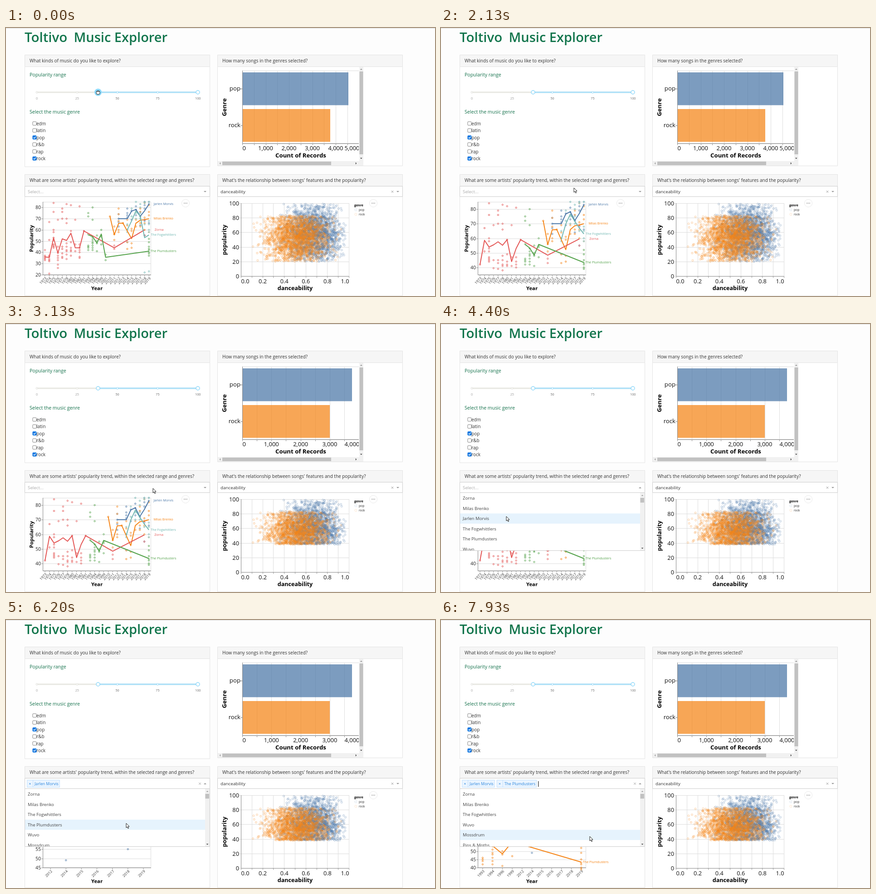
Write an HTML page with a canvas that moves like this. It is 946x592 px and loops after 8 s.

```html
<!DOCTYPE html>
<html lang="en">
<head>
<meta charset="utf-8">
<title>Music Explorer</title>
<style>
html, body { margin: 0; width: 946px; height: 592px; overflow: hidden; background: #fdfdfd; }
canvas { display: block; }
</style>
</head>
<body>
<canvas id="stage" width="946" height="592"></canvas>
<script>
const LOOP = 8000;
const FACE = '"Open Sans", "Noto Sans", sans-serif';
const BLUE = '#4c78a8', ORANGE = '#f58518';
const PALETTE = [BLUE, ORANGE, '#e45756', '#72b7b2', '#54a24b'];
const stage = document.getElementById('stage');
let c = stage.getContext('2d');

// moments at which the page reacts
const AT = { release: 330, trend: 1400, bars: 2700, open: 3730,
  pick1: 4600, solo: 5300, pick2: 6600, duo: 7400 };

// pointer path: time, x, y
const PATH = [[0, 203, 142], [330, 203, 142], [730, 222, 167], [1000, 224, 170], [2130, 293, 353],
  [3130, 324, 363], [3730, 324, 363], [4400, 144, 425], [4600, 144, 426],
  [6200, 265, 449], [6600, 265, 451], [7930, 328, 478]];

// all: mean per year for the full range, top: for popularity of 38 and above
const ACTS = [
  { name: 'Jarlen Morvis',
    all: { 2012: 70, 2014: 70, 2015: 76.7, 2016: 78.2, 2017: 72.2, 2018: 77, 2019: 83 },
    dots: { 2012: [70, 74, 67, 63], 2014: [79, 75, 73, 71, 49], 2015: [77, 69], 2016: [78, 81, 73],
      2017: [76, 72, 64], 2018: [85, 82, 79, 68, 55], 2019: [83, 85, 66] } },
  { name: 'Milas Brenko',
    all: { 2010: 72, 2011: 55.7, 2012: 65.8, 2013: 66, 2014: 59, 2015: 52.2, 2016: 66, 2017: 68.6, 2018: 69.1, 2019: 70 },
    dots: { 2010: [72], 2011: [56, 51, 63], 2012: [79, 74, 68, 60, 58], 2013: [66], 2014: [64, 49, 43, 69],
      2015: [61, 59, 48, 44], 2016: [69, 63], 2017: [79, 76, 66, 63], 2018: [84, 71, 66, 60], 2019: [82, 76, 73, 58] } },
  { name: 'Zorna',
    all: { 1973: 35.8, 1974: 35.4, 1975: 52.7, 1976: 39.4, 1977: 52, 1978: 50.6, 1980: 57, 1981: 44, 1982: 44, 1991: 59, 2011: 44, 2018: 60 },
    top: { 1973: 42, 1974: 58.6, 1975: 54, 1976: 55.5, 1977: 57.6, 1978: 55.2, 1980: 59, 1981: 44, 1982: 53, 1991: 59, 2011: 48.4, 2018: 59.6 },
    dots: { 1973: [42, 37, 36, 35, 34, 33], 1974: [67, 51, 37, 36, 34, 33, 32, 21],
      1975: [84, 76, 60, 58, 53, 51, 47, 46, 45, 44], 1976: [69, 45, 39.5, 37, 35, 33, 29, 26],
      1977: [79, 76, 70, 45, 43, 39, 36, 35], 1978: [83, 70, 66, 48, 45, 42, 41, 38, 34],
      1980: [82, 59, 49, 44, 42, 41, 37], 1981: [69, 47, 41], 1982: [81, 47, 44, 42, 40, 36, 35], 1991: [59],
      2011: [46, 43], 2018: [69, 55] } },
  { name: 'The Fogwhittlers',
    all: { 2014: 60, 2015: 68, 2016: 77, 2017: 72, 2018: 53, 2019: 55.5 },
    top: { 2014: 59.2, 2015: 69.8, 2016: 76.6, 2017: 71.6, 2018: 67, 2019: 63 },
    dots: { 2014: [65, 60, 58], 2015: [79, 72], 2016: [85, 75, 70], 2017: [83, 80, 75, 70],
      2018: [85, 84, 65, 22], 2019: [85, 68, 65, 60, 58, 23] } },
  { name: 'The Plumdusters',
    all: { 1993: 55.6, 1994: 54, 1996: 48.3, 1999: 56.3, 2001: 35.5, 2019: 41 },
    top: { 1993: 55.8, 1994: 53.3, 1996: 48.4, 1999: 55.8, 2019: 43.4 },
    dots: { 1993: [75, 72, 56, 46, 45, 44, 42], 1994: [80, 69, 53, 51, 49, 48, 46, 44, 42],
      1996: [55, 50, 48, 41], 1999: [60, 55, 54, 47], 2001: [37.9, 33], 2019: [52, 49, 45, 43, 42, 40, 39, 37] } }
];
const OPTIONS = ['Zorna', ACTS[1].name, ACTS[0].name, ACTS[3].name, ACTS[4].name, 'Wuvo', 'Mossdrum', "Pins & Moths"];

function text(s, x, y, size, color = '#333', align = 'left', weight = 400) {
  c.font = `${weight} ${size}px ${FACE}`;
  c.fillStyle = color;
  c.textAlign = align;
  c.fillText(s, x, y);
}
function turned(s, x, y, angle, ...style) {
  c.save();
  c.translate(x, y);
  c.rotate(angle);
  text(s, 0, 0, ...style);
  c.restore();
}
function rect(x, y, w, h, fill, stroke) {
  if (fill) { c.fillStyle = fill; c.fillRect(x, y, w, h); }
  if (stroke) { c.strokeStyle = stroke; c.lineWidth = 1; c.strokeRect(x + .5, y + .5, w - 1, h - 1); }
}
function line(points, color, width = 1) {
  c.strokeStyle = color;
  c.lineWidth = width;
  c.lineJoin = 'round';
  c.beginPath();
  points.forEach(p => c.lineTo(...p));
  c.stroke();
}
function ring(x, y, r, stroke, width = 1, fill) {
  c.beginPath();
  c.arc(x, y, r, 0, 7);
  if (fill) { c.fillStyle = fill; c.fill(); }
  c.strokeStyle = stroke;
  c.lineWidth = width;
  c.stroke();
}
function tri(x, y, dx, dy, color, s = 3) {
  c.fillStyle = color;
  c.beginPath();
  c.moveTo(x + dx * s / 2, y + dy * s / 2);
  c.lineTo(x - dx * s / 2 - dy * s, y - dy * s / 2 - dx * s);
  c.lineTo(x - dx * s / 2 + dy * s, y - dy * s / 2 + dx * s);
  c.fill();
}
function cross(x, y, r, color) {
  line([[x - r, y - r], [x + r, y + r]], color);
  line([[x - r, y + r], [x + r, y - r]], color);
}
function clipped(x, y, w, h, draw) {
  c.save();
  c.beginPath();
  c.rect(x, y, w, h);
  c.clip();
  draw();
  c.restore();
}

function card(x, y, h, title) {
  rect(x, y, 409, h, '#fff', '#e4e4e4');
  rect(x, y, 409, 27, '#f6f6f6', '#e4e4e4');
  text(title, x + 11, y + 17, 10);
}
function moreButton(x) {
  ring(x, 387, 8.5, '#eaeaea', 1, '#fff');
  for (const d of [-3, 0, 3]) rect(x + d - 1, 386, 1.8, 1.8, '#a8a8a8');
}

function controls(t) {
  text('Popularity range', 52, 107, 10.5, '#12704a');
  rect(68, 140.5, 355, 3, '#e8e8e2');
  rect(203, 140.5, 220, 3, '#a9e0fa');
  for (let i = 0; i < 5; i++) {
    const x = 68 + 88.8 * i, on = i > 1;
    ring(x, 142, 2, on ? '#8fd6f8' : '#deded8', 1, '#fff');
    text(25 * i, x, 157.5, 7.2, on ? '#666' : '#999', 'center');
  }
  const held = t < AT.release;
  if (held) ring(203, 142, 6, '#8bd8fb', 4, '#5cc5f5');
  else ring(203, 142, 4, '#90d8f9', 1.5, '#fff');
  ring(423, 142, 4, '#90d8f9', 1.5, '#fff');

  text('Select the music genre', 52, 189, 10.6, '#12704a');
  ['edm', 'latin', 'pop', 'r&b', 'rap', 'rock'].forEach((s, i) => {
    const y = 211 + 15.45 * i, on = i === 2 || i === 5;
    c.beginPath();
    c.roundRect(58.9, y - 4.1, 8, 8, 1.2);
    c.fillStyle = on ? '#0b74e0' : '#fff';
    c.fill();
    c.strokeStyle = on ? '#0b74e0' : '#777';
    c.lineWidth = .9;
    c.stroke();
    if (on) line([[60.6, y], [62.3, y + 1.9], [65.4, y - 2]], '#fff', 1.3);
    text(s, 67, y + 4, 10);
  });
}

function barChart(late) {
  const k = late ? 64.3 : 51.5, last = late ? 4 : 5;
  clipped(467, 86, 311, 208, () => {
    rect(521, 94, 280, 161, null, '#ddd');
    for (let i = 0; i <= last * 2; i++) {
      const x = Math.round(521 + k * i / 2) + .5;
      line([[x, 94], [x, 255]], '#ddd');
      line([[x, 255], [x, 259]], '#999');
    }
    c.globalAlpha = .73;
    rect(521.5, 98, late ? 241.5 : 233.5, 72.5, BLUE);
    rect(521.5, 179, late ? 192.5 : 193.5, 72.5, ORANGE);
    c.globalAlpha = 1;
    line([[521.5, 94], [521.5, 255.5], [780, 255.5]], '#888');
    for (const y of [134.5, 215.5]) line([[517, y], [521, y]], '#888');
    text('0', 521.5, 270, 13, '#111');
    for (let i = 1; i < last; i++) text(i + ',000', 521 + k * i, 270, 13, '#111', 'center');
    text(last + ',000', 779.5, 270, 13, '#111', 'right');
  });
  text('pop', 517, 138, 13.2, '#111', 'right');
  text('rock', 517, 219, 13.2, '#111', 'right');
  text('Count of Records', 650, 286, 13.2, '#000', 'center', 700);
  turned('Genre', 486, 175, -Math.PI / 2, 13.2, '#000', 'center', 700);

  rect(779, 86, 9, 208, '#f1f1f1');
  rect(779.5, 96, 8, 183, '#c1c1c1');
  tri(783.3, 91, 0, -1, '#888', 2.4);
  tri(783.3, 288, 0, 1, '#444', 2.4);
  rect(467, 294, 321, 10, '#f1f1f1');
  rect(477, 295, 240, 8, '#c1c1c1');
  tri(472, 299, -1, 0, '#999', 2.4);
  tri(772, 299, 1, 0, '#444', 2.4);
}

function trendChart(acts, key, lo, step, bottom) {
  const rows = acts.map(a => a[key] || a.all);
  const years = [...new Set(rows.flatMap(Object.keys))].sort();
  const gap = 239 / years.length;
  const px = y => 81 + gap * (years.indexOf(String(y)) + .5);
  const py = v => bottom - (v - lo) * (bottom - 384) / (85 - lo);

  rect(81, 384, 239, bottom - 384, null, '#ddd');
  for (let v = Math.ceil(lo / step) * step; v <= 85; v += step) {
    const y = Math.round(py(v)) + .5;
    line([[81, y], [320, y]], '#ddd');
    line([[78, y], [81, y]], '#999');
    text(v, 77, y + 3.5, 10.4, '#222', 'right');
  }
  line([[81.5, 384], [81.5, bottom + .5], [320, bottom + .5]], '#888');
  for (const y of years) {
    line([[px(y), bottom], [px(y), bottom + 4]], '#999');
    turned(y, px(y) + 4.5, bottom + 8.5, -Math.PI / 4, 8, '#333', 'right');
  }
  const floor = key === 'all' ? 0 : 38;
  acts.forEach((a, i) => {
    for (const y in a.dots) for (const v of a.dots[y])
      if (v >= floor && years.includes(y)) ring(px(y), py(v), 1.6, PALETTE[i], 1);
  });
  acts.forEach((a, i) => {
    const pts = Object.entries(rows[i]).map(([y, v]) => [px(y), py(v)]);
    line(pts, PALETTE[i], 2);
    const [x, y] = pts[pts.length - 1];
    text(a.name, x + 32, y + 2, 7.2, PALETTE[i], 'center');
  });
  turned('Popularity', 60, 465, -Math.PI / 2, 11.4, '#000', 'center', 700);
  text('Year', 200.5, bottom + 34, 11.3, '#000', 'center', 700);
}

function cloud(floor) {
  const sheet = document.createElement('canvas');
  sheet.width = 946;
  sheet.height = 592;
  const main = c;
  c = sheet.getContext('2d');
  let seed = 77;
  const rnd = () => (seed = (seed * 16807) % 2147483647) / 2147483647;
  const bell = (m, s) => m + s * (rnd() + rnd() + rnd() + rnd() - 2) * 1.73;
  const fill = (n, color, mx, sx, my, sy, top) => {
    c.globalAlpha = .36;
    for (let i = 0; i < n;) {
      const x = bell(mx, sx), y = bell(my, sy);
      if (x < .1 || x > .97 || y < 20 || y > top) continue;
      i++;
      if (y >= floor) ring(518 + 238 * x, 548 - 1.61 * y, 1.9, color, 1.1);
    }
  };
  fill(2300, BLUE, .67, .128, 58, 21, 99);
  fill(2300, ORANGE, .52, .145, 54, 20, 83);
  c = main;
  return sheet;
}
const clouds = [cloud(20), cloud(38)];

function scatterChart(late) {
  for (let i = 0; i <= 10; i++) {
    const x = Math.round(518 + 23.8 * i) + .5;
    line([[x, 387], [x, 548]], '#ddd');
    line([[x, 548], [x, 552]], '#999');
  }
  for (let i = 0; i <= 5; i++) {
    const y = Math.round(548 - 32.2 * i) + .5;
    line([[514, y], [756, y]], '#ddd');
    text(20 * i, 514, y + 4.2, 12.8, '#111', 'right');
    const align = i === 0 ? 'left' : i === 5 ? 'right' : 'center';
    text((i / 5).toFixed(1), 518.5 + 47.6 * i, 564, 12.8, '#111', align);
  }
  c.drawImage(clouds[late ? 1 : 0], 0, 0);
  line([[518.5, 387], [518.5, 548.5], [756, 548.5]], '#888');
  text('danceability', 637.5, 579, 12.6, '#000', 'center', 700);
  turned('popularity', 486, 468, -Math.PI / 2, 12.9, '#000', 'center', 700);
  text('genre', 768, 393.5, 7, '#000', 'left', 700);
  ['pop', 'rock'].forEach((s, i) => {
    c.globalAlpha = .2;
    ring(771.5, 401.5 + 10 * i, 2.5, [BLUE, ORANGE][i]);
    c.globalAlpha = 1;
    text(s, 778, 404 + 10 * i, 6.7, '#222');
  });
  moreButton(810);
}

function picker(t, [, cy]) {
  const open = t >= AT.open;
  const picked = [];
  if (t >= AT.pick1) picked.push(ACTS[0].name);
  if (t >= AT.pick2) picked.push(ACTS[4].name);
  rect(41, 349, 409, 24, '#fff', '#ccc');
  let x = 46;
  for (const s of picked) {
    c.font = `400 8.7px ${FACE}`;
    const w = c.measureText(s).width + 20;
    rect(x, 353, w, 17, '#ebf5ff', '#c2e0ff');
    line([[x + 13.5, 353], [x + 13.5, 370]], '#c2e0ff');
    cross(x + 6.8, 361.8, 1.5, '#2a85dd');
    text(s, x + 17, 365.2, 8.7, '#2a85dd');
    x += w + 4;
  }
  if (!picked.length) text('Select...', 48, 365, 9.8, '#aaa');
  else cross(427.5, 361.5, 2.2, '#999');
  tri(439, 361.5, 0, open ? -1 : 1, '#999', 3);
  if (!open) return;

  const since = t - (picked.length > 1 ? AT.pick2 : picked.length ? AT.pick1 : AT.open);
  if (Math.floor(since / 530) % 2 === 0) rect(x + (picked.length ? -1 : 2), 356, 1.2, 12.5, '#222');
  rect(41, 372, 409, 129, '#fff', '#ccc');
  const hot = Math.max(0, Math.floor((cy - 373.2) / 22.5));
  clipped(42, 373, 407, 127, () => {
    OPTIONS.filter(s => !picked.includes(s)).slice(0, 6).forEach((s, i) => {
      const y = 384.5 + 22.5 * i;
      if (i === hot) rect(42, y - 11, 397, 22.5, '#e6f3fd');
      text(s, 48, y + 3.6, 9.6, '#444');
    });
    rect(439, 373, 10, 127, '#f1f1f1');
    rect(439.5, 384, 8.5, 10.5, '#c1c1c1');
    tri(444, 378.5, 0, -1, '#999', 2.4);
    tri(444, 495.5, 0, 1, '#444', 2.4);
  });
}

function pointerAt(t) {
  const i = Math.max(1, PATH.findIndex(p => p[0] >= t));
  const end = t > PATH[PATH.length - 1][0] ? PATH.length - 1 : i;
  const [t0, x0, y0] = PATH[end - 1], [t1, x1, y1] = PATH[end];
  const u = Math.min(1, (t - t0) / (t1 - t0)), e = u * u * (3 - 2 * u);
  return [x0 + (x1 - x0) * e, y0 + (y1 - y0) * e];
}
function pointer(t, [x, y]) {
  c.save();
  c.translate(x, y);
  c.beginPath();
  if (t < AT.release) {
    c.roundRect(-4, -3, 8, 7.5, 3);
    for (const d of [-2, 0, 2]) { c.moveTo(d, -3.2); c.lineTo(d, -.8); }
  } else {
    [[0, 0], [0, 10], [2.3, 7.9], [4, 11.6], [5.6, 10.9], [4, 7.3], [7, 7.1]].forEach(p => c.lineTo(...p));
    c.closePath();
  }
  c.fillStyle = '#fff';
  c.fill();
  c.strokeStyle = '#222';
  c.lineWidth = 1;
  c.stroke();
  c.restore();
}

function draw(t) {
  const spot = pointerAt(t), late = t >= AT.bars;
  rect(0, 0, 946, 592, '#fdfdfd');
  rect(0, 0, 946, 1, '#dcdcdc');
  text('Toltivo', 41, 31, 29.4, '#12754c', 'left', 600);
  text('Music Explorer', 356, 31, 29, '#12754c', 'right', 600);

  card(41, 59, 248, 'What kinds of music do you like to explore?');
  card(466, 59, 246, 'How many songs in the genres selected?');
  card(41, 323, 269, "What are some artists' popularity trend, within the selected range and genres?");
  card(466, 323, 269, "What's the relationship between songs' features and the popularity?");
  controls(t);
  barChart(late);

  if (t < AT.trend) trendChart(ACTS, 'all', 20, 10, 545);
  else if (t < AT.solo) trendChart(ACTS, 'top', 35, 10, 545);
  else if (t < AT.duo) trendChart([ACTS[0]], 'top', 45, 5, 547);
  else trendChart([ACTS[0], ACTS[4]], 'top', 40, 5, 547);
  moreButton(396);

  rect(466, 349, 409, 24, '#fff', '#ccc');
  text('danceability', 473, 365, 9.8);
  cross(852, 361.5, 2.2, '#999');
  tri(864, 361.5, 0, 1, '#999', 3);
  scatterChart(late);
  picker(t, spot);
  pointer(t, spot);
}

// the picture advances in alternating holds of 130 and 70 ms
let shown = -1;
function tick(now) {
  const t = now % LOOP, part = t % 200;
  const held = t - part + (part >= 130 ? 130 : 0);
  if (held !== shown) draw(shown = held);
  requestAnimationFrame(tick);
}
draw(0);
requestAnimationFrame(tick);
</script>
</body>
</html>
```
